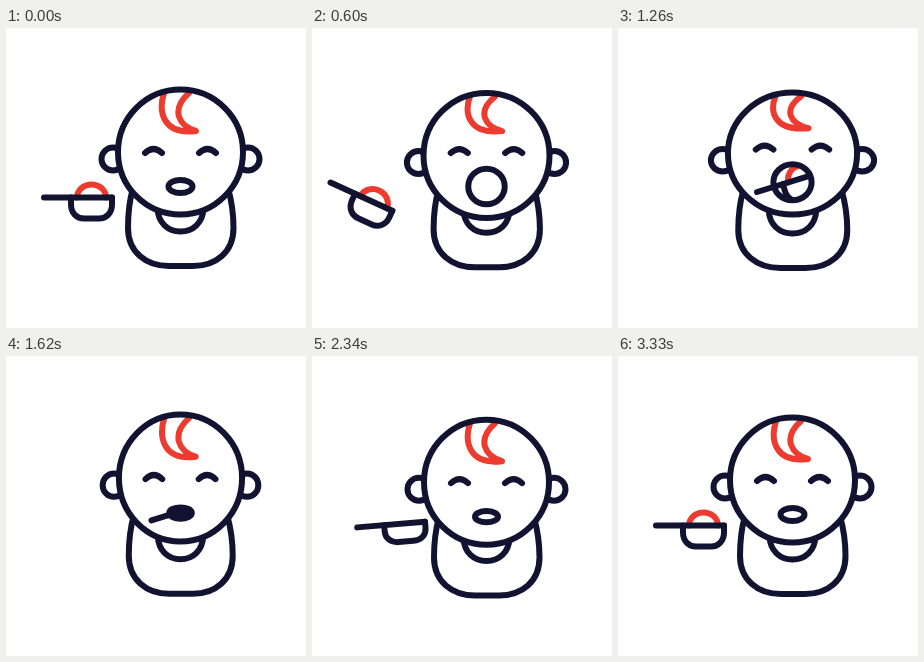
An HTML page with a canvas for the animation above (5.63 s loop, 300 by 300 pixels).

```html
<!DOCTYPE html>
<html lang="en">
<head>
<meta charset="utf-8">
<title>Feeding a baby</title>
<style>
html, body { margin: 0; width: 100%; height: 100%; overflow: hidden; background: #fff; }
canvas { display: block; width: 100vmin; height: 100vmin; }
</style>
</head>
<body>
<canvas id="stage" width="300" height="300"></canvas>
<script>
const ctx = document.getElementById('stage').getContext('2d');
const NAVY = '#121331', RED = '#ee3b2f';
const LOOP = 5630, ACTIVE = 3330, STEP = 30;
const CX = 174.5, HEAD_Y = 124, HEAD_R = 62.5;

// Smooth curve through [time, value] keys that never overshoots a key.
function track(...keys) {
  const slope = i => (keys[i + 1][1] - keys[i][1]) / (keys[i + 1][0] - keys[i][0]);
  const tangent = i => {
    if (i === 0 || i === keys.length - 1) return 0;
    const a = slope(i - 1), b = slope(i);
    return a * b > 0 ? 2 * a * b / (a + b) : 0;
  };
  return t => {
    const last = keys.length - 1;
    if (t <= keys[0][0]) return keys[0][1];
    if (t >= keys[last][0]) return keys[last][1];
    const i = keys.findIndex(k => k[0] > t) - 1;
    const [t0, v0] = keys[i], [t1, v1] = keys[i + 1];
    const d = t1 - t0, u = (t - t0) / d, w = 1 - u;
    return v0 * w * w * (1 + 2 * u) + v1 * u * u * (3 - 2 * u)
      + d * u * w * (tangent(i) * w - tangent(i + 1) * u);
  };
}

const motion = {
  headY: track([0, 0], [360, 6], [450, 7], [840, -6], [990, -8], [1170, -8], [1260, 1.5], [1350, 9],
    [1560, -4], [1800, 9], [2070, -2], [2160, -3], [2430, 4], [2670, 0]),
  bodyY: track([0, 0], [360, 2], [450, 2.5], [840, -1.5], [1170, -2], [1260, 2], [1350, 8],
    [1560, -1], [1800, 4], [2070, -1], [2430, 2], [2670, 0]),
  stretchX: track([0, 1], [450, 1.01], [840, 1], [1170, 0.99], [1260, 1.033], [1350, 1.1], [1560, 0.98], [1740, 1]),
  stretchY: track([0, 1], [1170, 1], [1260, 0.975], [1350, 0.92], [1560, 1.02], [1740, 1]),
  tilt: track([360, 0], [840, -7], [1170, -7.5], [1260, -5], [1380, 0]),
  open: track([0, 0], [240, 0], [360, 0.11], [840, 1], [1140, 1.05], [1260, 0.65], [1380, -0.05],
    [2670, -0.05], [3000, 0]),
  spoonX: track([0, 38], [360, 20], [510, 18], [600, 18.5], [840, 57], [1050, 97], [1260, 139], [1380, 146],
    [1860, 144], [2070, 121], [2280, 52], [2580, 30.5], [2700, 30.5], [3180, 38]),
  spoonY: track([0, 169.5], [360, 154], [510, 153], [840, 164], [1050, 169], [1260, 164], [1380, 167],
    [1560, 163], [1800, 172], [2070, 173], [2280, 172], [2670, 167], [3180, 169.5]),
  spoonAngle: track([0, 0], [360, 23], [510, 25], [840, 20.5], [1050, 0], [1260, -17], [2070, -17],
    [2280, -7], [2670, 4], [3180, 0]),
  bowl: track([1260, 1], [1380, 0.12], [2070, 0.12], [2430, 1]),
  food: track([1290, 1], [1380, 0], [2580, 0], [2670, 0.16], [3090, 1])
};

const shapes = {
  body: new Path2D('M127 160C123 174 122 188 122 200C122 224 140 238 163 238H187C210 238 227.5 224 227.5 200C227.5 188 226 174 222 160'),
  collar: new Path2D('M151.5 180C152 195 162 203.5 174.5 203.5S197 195 197.5 180'),
  hair: new Path2D('M158 65C152 84 157 107 190 103C173 98 164 82 183 65'),
  eyes: new Path2D('M139 125Q147.5 117 156 125M193 125Q201.5 117 210 125'),
  handle: new Path2D('M0 0H68'),
  bowl: new Path2D('M27 0V7C27 16 33 21 40 21H55C62 21 68 16 68 7V0')
};

// Transforms apply to the geometry only, so line weight stays constant.
function stroke(path, matrix, color = NAVY) {
  const placed = new Path2D();
  placed.addPath(path, matrix);
  ctx.strokeStyle = color;
  ctx.stroke(placed);
  return placed;
}

function ellipse(x, y, rx, ry = rx, from = 0, to = 2 * Math.PI) {
  const path = new Path2D();
  path.ellipse(x, y, rx, ry, 0, from, to);
  return path;
}

function drawSpoon(p, mouth) {
  const base = new DOMMatrix().translate(p.spoonX, p.spoonY).rotate(p.spoonAngle);
  ctx.save();
  // Whatever lies beyond the lips is visible only through the mouth.
  const visible = new Path2D();
  visible.rect(0, 0, mouth.x - mouth.rx + 4, 300);
  visible.ellipse(mouth.x, mouth.y, mouth.rx, mouth.ry, 0, 0, 2 * Math.PI);
  ctx.clip(visible);
  if (p.food > 0.01) stroke(ellipse(47.5, 0, 14.5, 13 * p.food, Math.PI), base, RED);
  stroke(shapes.bowl, base.scale(1, p.bowl));
  stroke(shapes.handle, base);
  ctx.restore();
}

function draw(t) {
  const p = {};
  for (const name in motion) p[name] = motion[name](t);

  const body = new DOMMatrix().translate(CX * (1 - p.stretchX), p.bodyY).scale(p.stretchX, 1);
  const head = new DOMMatrix().translate(CX, HEAD_Y + p.headY)
    .scale(p.stretchX, p.stretchY).translate(-CX, -HEAD_Y);
  const face = head.translate(0, p.tilt);
  const hair = head.translate(0, 66).scale(1, 1 + p.tilt / 37).translate(0, -66);
  const center = face.transformPoint({ x: CX, y: 158.5 });
  const mouth = {
    x: center.x, y: center.y,
    rx: (12 + 10 * p.open) * p.stretchX,
    ry: (6.5 + 18.5 * p.open) * p.stretchY
  };

  ctx.fillStyle = '#fff';
  ctx.fillRect(0, 0, 300, 300);
  ctx.lineWidth = 6;
  ctx.lineCap = ctx.lineJoin = 'round';

  stroke(shapes.body, body);
  stroke(shapes.collar, body);
  for (const side of [-1, 1]) stroke(ellipse(CX + side * 67.5, 131, 11.5), head);

  const skull = new Path2D();
  skull.addPath(ellipse(CX, HEAD_Y, HEAD_R), head);
  ctx.fill(skull);
  ctx.save();
  ctx.clip(skull);
  stroke(shapes.hair, hair, RED);
  ctx.restore();
  ctx.strokeStyle = NAVY;
  ctx.stroke(skull);

  stroke(shapes.eyes, face);
  drawSpoon(p, mouth);
  stroke(ellipse(mouth.x, mouth.y, mouth.rx, mouth.ry));
}

const start = performance.now();
function tick() {
  const t = (performance.now() - start) % LOOP;
  draw(Math.min(ACTIVE, Math.floor(t / STEP) * STEP));
  requestAnimationFrame(tick);
}
tick();
</script>
</body>
</html>
```
